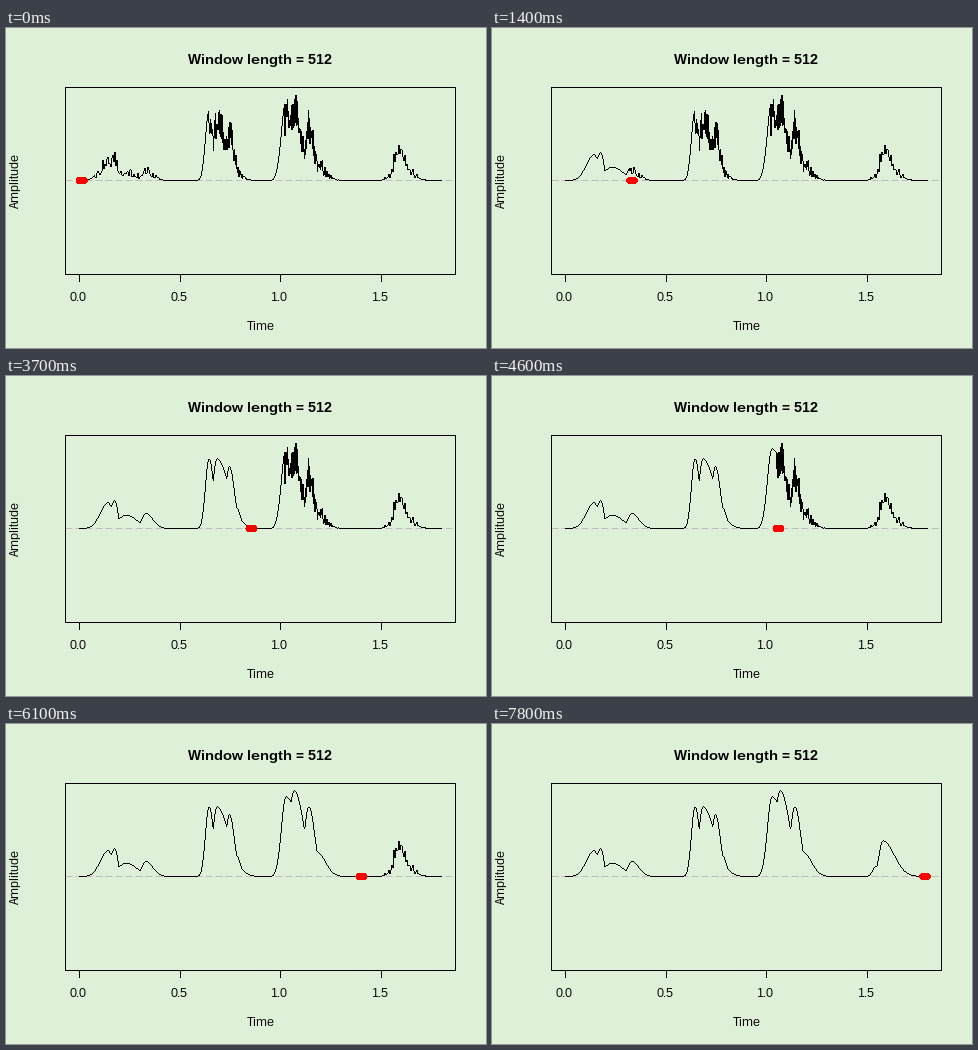
A matplotlib script that plays this animation: 480 by 320 pixels, repeating every 7900 ms.

```python
import numpy as np
import matplotlib.pyplot as plt
from matplotlib.animation import FuncAnimation

plt.rcParams.update({
    "font.family": "Liberation Sans",
    "path.simplify": False,
    "path.snap": False,
    "text.hinting": "native",
    "text.hinting_factor": 1,
})

W, H = 480, 320
FRAMES, INTERVAL = 79, 100
BG = "#dff0d8"
LEFT, RIGHT, TOP, BOTTOM = 59.5, 449.5, 59.5, 246.5
BASE = 152.5
X0, X1 = 73.5, 435.4          # time 0 and the end of the sound
PER_SEC = 201
WINDOW = 4.67                 # window width in pixels
STEP = (X1 - WINDOW - X0) / (FRAMES - 1)

# Syllables: end of the clean attack, noise grain, then humps
# as (centre, height, rise width, fall width)
SYLLABLES = [
    (89, 1.0, [(102, 26, 11, 8), (109, 28, 8, 4),
               (120, 13.5, 12, 16), (140, 15.5, 6, 10)]),
    (203, 0.5, [(203, 70, 5, 7), (211, 70, 6, 17),
                (223.5, 62, 6, 7), (230, 22, 5, 6)]),
    (279, 0.5, [(280, 80, 6.5, 20), (288.5, 86, 9, 13),
                (303, 70, 7, 8), (311, 25, 8, 12)]),
    (378, 1.0, [(384, 10, 5, 6), (391, 36, 5.5, 16)]),
]


def hump(x, centre, height, rise, fall):
    width = np.where(x < centre, rise, fall)
    return height * np.exp(-((x - centre) / width) ** 2)


def envelopes(x):
    """Smoothed and raw envelope; the raw one dips more where it is quiet."""
    rng = np.random.default_rng(12)
    smooth, raw = np.zeros_like(x), np.zeros_like(x)
    for attack, grain, humps in SYLLABLES:
        env = np.max([hump(x, *h) for h in humps], axis=0)
        knots = np.arange(x.min(), x.max() + grain, grain)
        noise = np.interp(x, knots, rng.random(knots.size))
        dip = noise * (0.9 - 0.45 * env / env.max())
        rough = np.where(x < attack, env, env * (1.04 - dip))
        smooth, raw = np.maximum(smooth, env), np.maximum(raw, rough)
    return smooth, raw


# Each pixel column is one vertical stroke over its samples
cols = np.arange(int(X0), int(X1) + 1)
xs = cols[:, None] + np.linspace(0, 1, 5)
smooth, raw = envelopes(xs)

fig = plt.figure(figsize=(W / 72, H / 72), dpi=72, facecolor=BG)
ax = fig.add_axes([0, 0, 1, 1])
ax.set_xlim(0, W)
ax.set_ylim(H, 0)
ax.axis("off")


def line(x, y, **style):
    style = {"color": "black", "lw": 1, "snap": False, **style}
    return ax.plot(x, y, **style)[0]


def label(x, y, text, size=12, **style):
    ax.text(x, y, text, fontsize=size, ha="center", va="baseline",
            rotation_mode="anchor", **style)


line([LEFT, RIGHT], [BASE, BASE], color="#bebebe", dashes=(7, 3),
     dash_capstyle="butt")
line([LEFT, RIGHT, RIGHT, LEFT, LEFT], [TOP, TOP, BOTTOM, BOTTOM, TOP],
     solid_joinstyle="miter", solid_capstyle="projecting")
for t in (0, 0.5, 1, 1.5):
    x = np.floor(X0 + t * PER_SEC) + 0.5
    line([x, x], [BOTTOM, BOTTOM + 7.5], solid_capstyle="butt")
    label(x - 1, 273, f"{t:.1f}")
label(253.5, 36, "Window length = 512", 14.4, weight="bold")
label(254.5, 302, "Time")
label(13, BASE - 0.5, "Amplitude", rotation=90)

curve = ax.vlines(cols + 0.5, BASE, BASE, color="black", lw=1, zorder=3,
                  capstyle="butt", snap=False)
marker = line([], [], color="red", lw=6, solid_capstyle="round",
              antialiased=False, zorder=5)


def draw(i):
    start = X0 + i * STEP
    height = np.where(xs < start, smooth, raw)
    low = np.round(height.min(axis=1))
    high = np.maximum(np.round(height.max(axis=1)), low + 1)
    floor = BASE + 0.5
    curve.set_segments([[(c + 0.5, floor - a), (c + 0.5, floor - b)]
                        for c, a, b in zip(cols, low, high)])
    marker.set_data([start, start + WINDOW], [BASE, BASE])
    return curve, marker


anim = FuncAnimation(fig, draw, frames=FRAMES, interval=INTERVAL,
                     repeat=True, repeat_delay=0)
plt.show()
```
